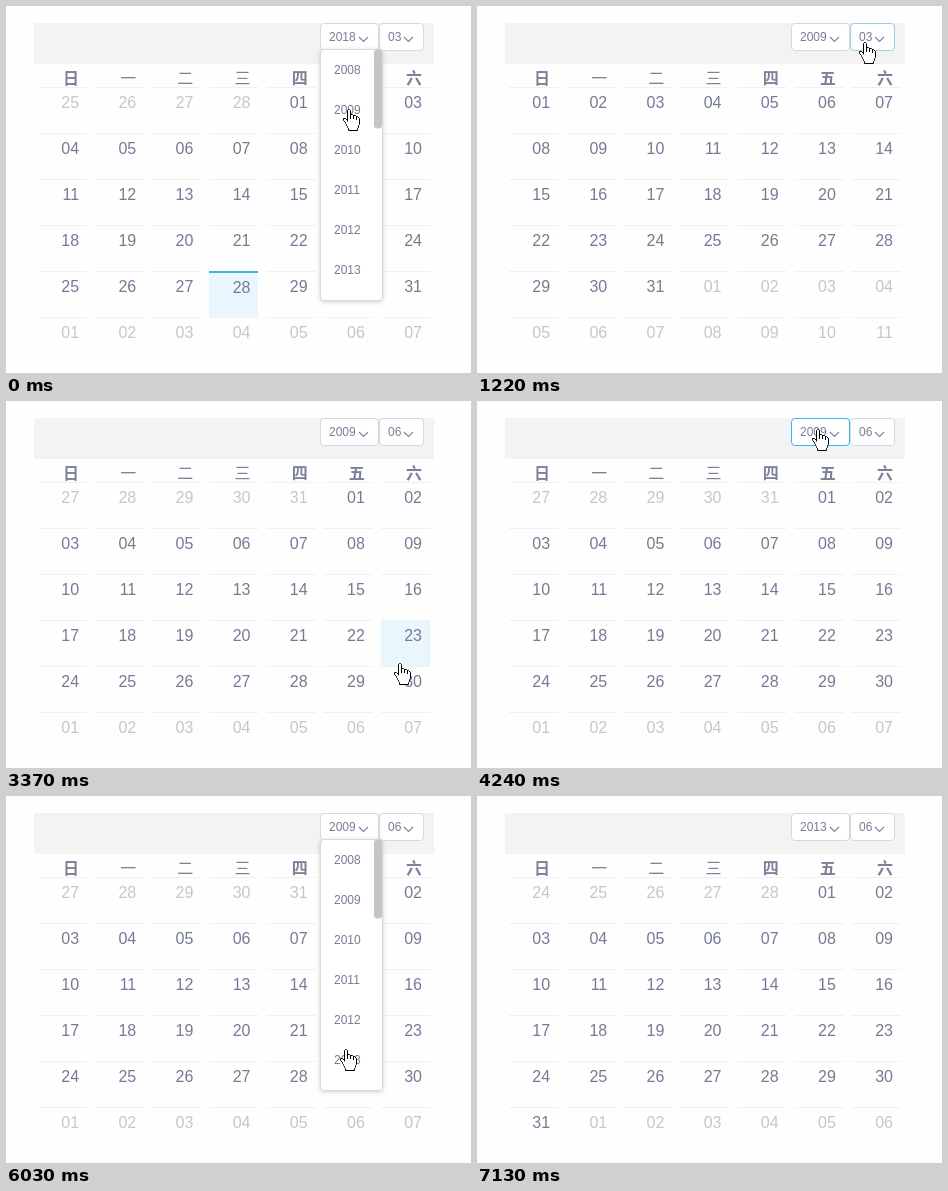
Recreate the animation shown at these times as an HTML page. Size 465 px wide and 367 px high, loop 7690 ms.

```html
<!DOCTYPE html>
<html lang="zh">
<head>
<meta charset="utf-8">
<title>Calendar</title>
<style>
  html, body { margin: 0; width: 100%; height: 100%; overflow: hidden; background: #fefefe; }
  svg { display: block; width: 465px; height: 367px; font-family: "Liberation Sans", Arial, sans-serif; }
  .day { font-size: 16px; text-anchor: end; fill: #757a93; }
  .out { fill: #c6c6c6; }
  .week { font: bold 16px "Noto Sans CJK SC", "Noto Sans CJK", "Noto Sans CJK JP", sans-serif; text-anchor: end; fill: #7d8198; }
  .thin { font-weight: normal; }
  .small { font-size: 12px; fill: #797d94; }
  .chevron { fill: none; stroke: #7c81a0; stroke-width: 1.1; }
  .box { fill: #fff; stroke: #d6d8de; }
  .menu { filter: drop-shadow(0 1px 2px rgba(0, 0, 0, .18)); }
  .hand { fill: #fff; stroke: #000; stroke-width: 1; }
</style>
</head>
<body>
<svg id="stage" viewBox="0 0 465 367"></svg>
<script>
const LOOP = 7690, COL = 400 / 7, ROW = 46, TOP = 81;
const stage = document.getElementById('stage');

function add(tag, attrs, parent = stage, text) {
  const el = document.createElementNS('http://www.w3.org/2000/svg', tag);
  for (const k in attrs) el.setAttribute(k, attrs[k]);
  if (text) el.textContent = text;
  parent.append(el);
  return el;
}
const rect = (x, y, width, height, fill, parent) => add('rect', { x, y, width, height, fill }, parent);
const label = (x, y, cls, text, parent) => add('text', { x, y, class: cls }, parent, text);
const show = (el, on) => el.setAttribute('visibility', on ? 'visible' : 'hidden');
const pad = n => String(n).padStart(2, '0');
const cellX = c => 32 + COL * c;

// Calendar grid
rect(28, 17, 400, 41, '#f3f3f3');
[...'日一二三四五六'].forEach((ch, i) =>
  label(cellX(i) + 41.1, 77.5, '一二三'.includes(ch) ? 'week thin' : 'week', ch));

const hover = rect(0, 0, 49.5, ROW, '#e9f6fd');
const cells = [];
for (let i = 0; i < 42; i++) {
  const c = i % 7, r = Math.floor(i / 7);
  rect(cellX(c), TOP + ROW * r, 49.1, 1, '#f0f0f0');
  cells.push(label(cellX(c) + 41.1, 102 + ROW * r, 'day'));
}
const today = add('g', {});
rect(203, 265, 49, 46, '#e9f6fd', today);
rect(203, 265, 49, 2, '#3fb4dc', today);
label(cellX(3) + 41.1, 287, 'day', '28', today);

// Selects and their menus
function select(x, width) {
  const box = add('rect', { x: x + .5, y: 17.5, width: width - 1, height: 27, rx: 3.5, class: 'box' });
  const text = label(x + 9, 35, 'small');
  const cx = x + width - 15.5;
  add('path', { d: `M${cx - 4.5} 31l4.5 4.5l4.5-4.5`, class: 'chevron' });
  return { box, text };
}
function menu(x, width, items, thumb) {
  const g = add('g', {});
  add('rect', { x: x + .5, y: 43.5, width: width - 1, height: 251, rx: 3.5, class: 'box menu' }, g);
  items.forEach((t, i) => label(x + 14, 68 + 40 * i, 'small', t, g));
  add('rect', { x: x + width - 9, y: 43.5, width: 8, height: thumb, rx: 3.5, fill: '#c5c5c5' }, g);
  return g;
}
const year = select(314, 59), month = select(373, 45);
const six = [0, 1, 2, 3, 4, 5];
const yearMenu = menu(314, 63, six.map(i => String(2008 + i)), 79);
const monthMenu = menu(373, 49, six.map(i => pad(i + 1)), 131);

const hand = add('g', { class: 'hand' });
add('path', { d: 'M4.5 12.5V1.5L5.5.5H6.5L7.5 1.5V5.5H9.5L10.5 6.5H12.5L13.5 7.5H14.5L16.5 9.5V15.5L15.5 16.5V18.5L14.5 19.5V21.5H5.5V19.5L4.5 18.5V17.5L3.5 16.5V15.5L2.5 14.5V13.5L.5 11.5V9.5H2.5L4.5 11.5' }, hand);
add('path', { d: 'M7.5 5V10M10.5 6V10M13.5 7V11', fill: 'none' }, hand);

// Pages: start time, labels, leading days, days in month, last day before
const pages = [
  { t: 0, y: '2018', m: '03', lead: 4, days: 31, prev: 28, today: true },
  { t: 430, y: '2009', m: '03', lead: 0, days: 31, prev: 28 },
  { t: 3370, y: '2009', m: '06', lead: 5, days: 30, prev: 31 },
  { t: 6400, y: '2013', m: '06', lead: 5, days: 31, prev: 28 }
];

// Cursor moves: [start, end, steps, x, y]; the first step lands at start
const moves = [
  [860, 1220, 4, 382, 36],
  [2250, 2400, 2, 376, 154],
  [2550, 2970, 4, 388, 262],
  [3520, 4240, 6, 335, 28],
  [4940, 5760, 7, 338, 231],
  [5880, 6030, 2, 334, 253],
  [6830, 6980, 2, 394, 342]
];

function cursorAt(t) {
  let x = 337, y = 103;
  for (const [a, b, n, tx, ty] of moves) {
    if (t < a) break;
    const k = Math.min(n, Math.floor((t - a) / (b - a) * (n - 1) + 1.001)) / n;
    x += (tx - x) * k;
    y += (ty - y) * k;
  }
  return [Math.round(x), Math.round(y)];
}

function monthBorder(t) {
  if (t < 1220 || t >= 2680) return '';
  if (t < 1370) return '#a3cfe2';
  if (t < 1490) return '#62c0ea';
  if (t < 2250) return '#2db7f5';
  return t < 2550 ? '#84b4cc' : '#b4cad6';
}
function yearBorder(t) {
  if (t < 4090 || t >= 5220) return '';
  if (t < 4240) return '#a3cfe2';
  return t < 4940 ? '#2db7f5' : '#84b4cc';
}

let current;
function fill(p) {
  if (p === current) return;
  current = p;
  year.text.textContent = p.y;
  month.text.textContent = p.m;
  show(today, p.today);
  cells.forEach((el, i) => {
    const d = i - p.lead + 1;
    const out = d < 1 || d > p.days;
    el.textContent = pad(d < 1 ? p.prev + d : out ? d - p.days : d);
    el.setAttribute('class', out ? 'day out' : 'day');
    show(el, !(p.today && d === 28));
  });
}

function draw() {
  const t = performance.now() % LOOP;
  fill(pages.filter(p => t >= p.t).pop());

  const yearOpen = t < 430 || (t >= 4800 && t < 6400);
  const monthOpen = t >= 2100 && t < 3370;
  show(yearMenu, yearOpen);
  show(monthMenu, monthOpen);
  year.box.style.stroke = yearBorder(t);
  month.box.style.stroke = monthBorder(t);

  const [x, y] = cursorAt(t);
  const visible = t < 7130;
  hand.setAttribute('transform', `translate(${x} ${y})`);
  show(hand, visible);

  const c = Math.floor((x + 5 - 28) / COL), r = Math.floor((y - TOP) / ROW);
  show(hover, visible && !yearOpen && !monthOpen && r >= 0 && r < 6);
  hover.setAttribute('x', cellX(c));
  hover.setAttribute('y', TOP + ROW * r);
  requestAnimationFrame(draw);
}
draw();
</script>
</body>
</html>
```
